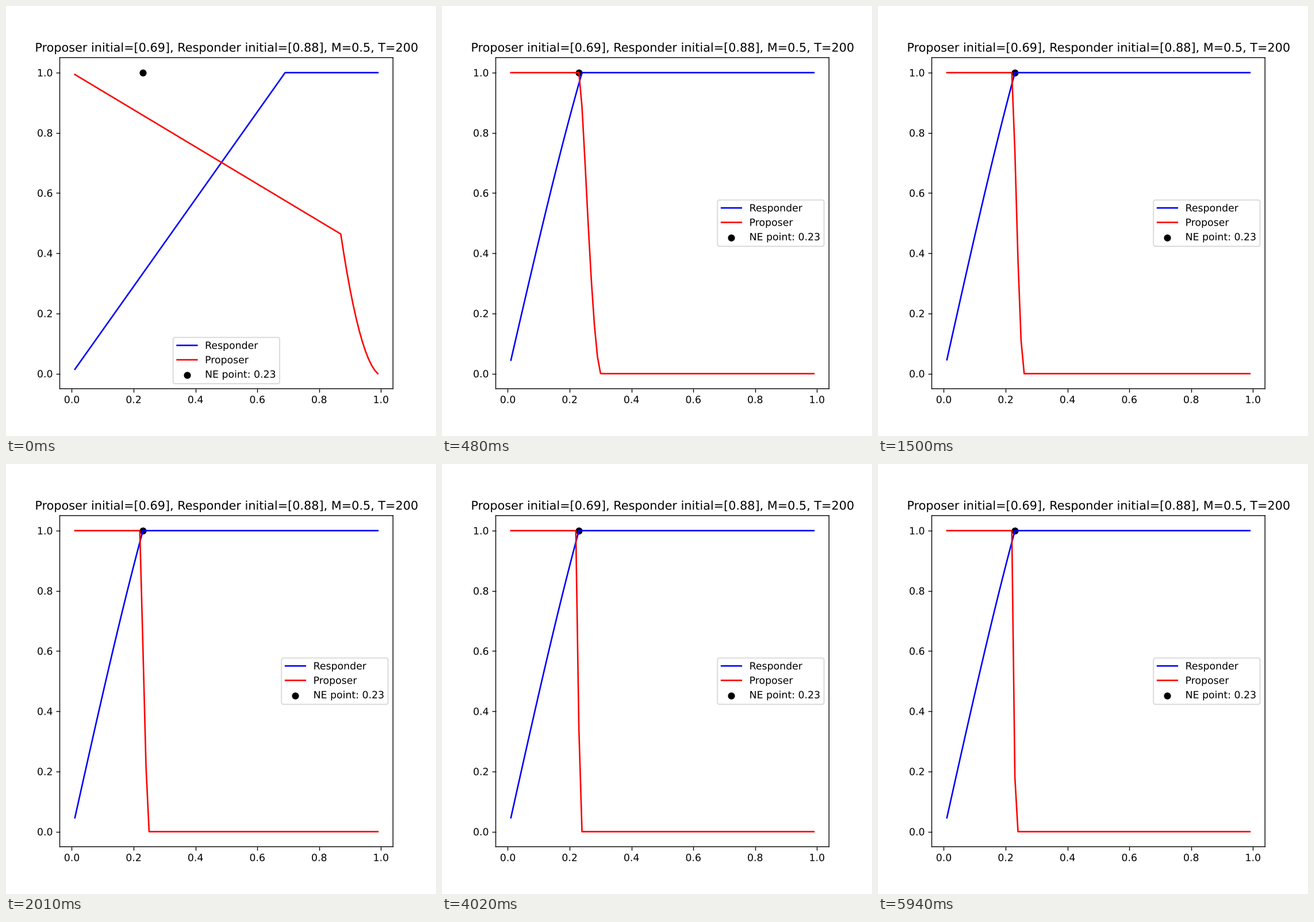
Write a matplotlib script that moves like this. It is 748 px wide and 748 px high and loops after 5970 ms.

```python
import numpy as np
import matplotlib.pyplot as plt
from matplotlib.animation import FuncAnimation
from matplotlib.patheffects import Normal

SIZE = 748
M, T = 0.5, 200
OFFER, THRESHOLD, NE = 0.69, 0.88, 0.23

grid = np.arange(1, 100) / 100


def pure(value):
    """Mixed strategy that puts all mass on one grid point."""
    mix = np.zeros(len(grid))
    mix[round(value * 100) - 1] = 1
    return mix


def project(v):
    """Euclidean projection onto the probability simplex."""
    s = np.sort(v)[::-1]
    shift = (np.cumsum(s) - 1) / np.arange(1, len(s) + 1)
    k = np.nonzero(s > shift)[0][-1]
    return np.maximum(v - shift[k], 0)


def learn():
    """Follow-the-regularized-leader play of the ultimatum game."""
    prop, resp = pure(OFFER), pure(THRESHOLD)
    gain_p, gain_r = np.zeros(len(grid)), np.zeros(len(grid))
    history = []
    for _ in range(T - 1):
        gain_p += (1 - grid) * np.cumsum(resp)
        gain_r += np.cumsum((grid * prop)[::-1])[::-1]
        prop, resp = project(M * gain_p), project(M * gain_r)
        history.append((np.cumsum(resp), 1 - np.cumsum(prop)))
    return history


history = learn()

# Smooth subpixel rendering: no pixel snapping, text drawn as outlines.
plt.rcParams.update({
    "font.family": "DejaVu Sans",
    "path.snap": False,
    "path.effects": [Normal()],
    "text.hinting": "no_hinting",
})

fig, ax = plt.subplots(figsize=(6, 6), dpi=SIZE / 6)
accept, offer = history[0]
blue, = ax.plot(grid, accept, color="blue", label="Responder")
red, = ax.plot(grid, offer, color="red", label="Proposer")
ax.scatter([NE], [1], color="black", label=f"NE point: {NE}")
ax.set_xlim(-0.039, 1.039)
ax.set_ylim(-0.05, 1.05)
ax.set_title(f"Proposer initial=[{OFFER}], Responder initial=[{THRESHOLD}], M={M}, T={T}")
ax.legend(loc="best")


def update(i):
    accept, offer = history[i]
    blue.set_ydata(accept)
    red.set_ydata(offer)
    return blue, red


anim = FuncAnimation(fig, update, frames=len(history), interval=30,
                     repeat=True, repeat_delay=0, blit=False)
plt.show()
```
